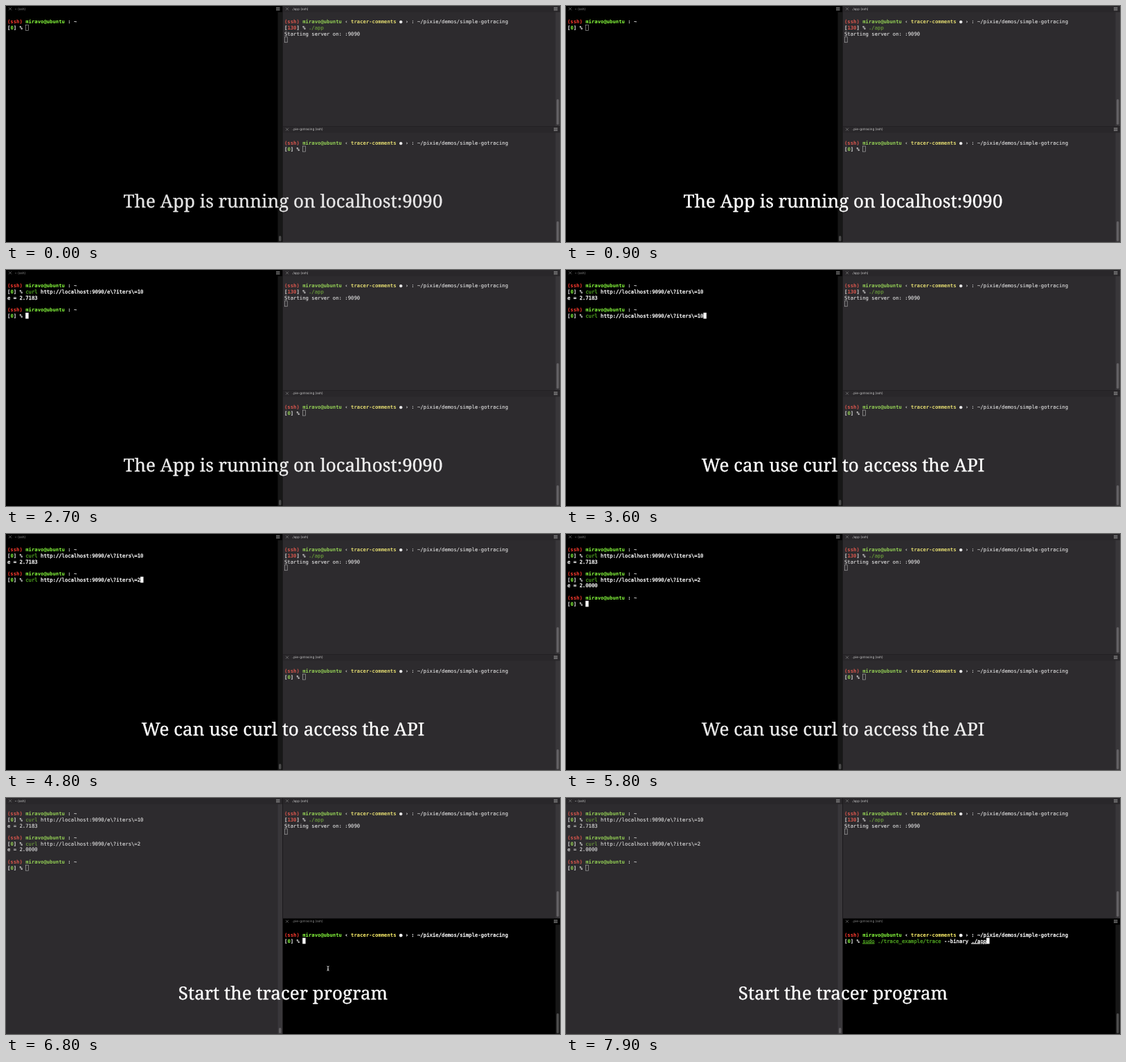
Write an HTML page that moves like this. It is 800x342 px and loops after 8 s.

```html
<!DOCTYPE html>
<html lang="en">
<head>
<meta charset="utf-8">
<title>Terminal tracing demo</title>
<style>
  html, body { margin: 0; width: 100%; height: 100%; overflow: hidden; background: #000; }
  svg { display: block; width: 800px; height: 342px; }
  text { white-space: pre; text-rendering: geometricPrecision; }
  .on  { --bg: #000; --bar: #000; --track: #171717; --thumb: #4c4c4c; --title: #8e8e8e; --weight: .32;
         --fg: #fff; --red: #ff3b2f; --green: #86fb3c; --yellow: #fff36b; --cmd: #4fa321; }
  .off { --bg: #2d2b2e; --bar: #29272a; --track: #39373a; --thumb: #626063; --title: #c9c9c9; --weight: .1;
         --fg: #e4e4e4; --red: #d8564d; --green: #93cf55; --yellow: #e2da70; --cmd: #6fa53c; }
  .term { font: 7.25px "DejaVu Sans Mono", "Liberation Mono", monospace; color: var(--fg);
          fill: currentColor; stroke: currentColor; stroke-width: var(--weight); }
  .title { font: 4.7px Inter, "Open Sans", sans-serif; fill: var(--title); }
  .red { color: var(--red); }
  .green { color: var(--green); }
  .yellow { color: var(--yellow); }
  .cmd { color: var(--cmd); }
  .red, .green, .yellow, .bold { font-weight: bold; stroke-width: 0; }
  .line { text-decoration: underline; }
  .caption { font: 26.05px "Noto Serif", serif; fill: #fff; stroke: #fff; stroke-width: .3; text-anchor: middle; }
</style>
</head>
<body>
<svg id="stage" viewBox="0 0 800 342"></svg>
<script>
const LOOP = 8000, CELL = 4.365, ROW = 8.73;
const stage = document.getElementById('stage');

const span = (cls, text) => `<tspan class="${cls}">${text}</tspan>`;
const rect = (x, y, w, h, fill) => `<rect x="${x}" y="${y}" width="${w}" height="${h}" fill="${fill}"/>`;

const user = span('red', '(ssh)') + ' ' + span('green', 'miravo@ubuntu');
const home = user + span('bold', ' : ~');
const repo = user + ' ‹ ' + span('yellow', 'tracer-comments') + ' ● › : ~/pixie/demos/simple-gotracing';
const prompt = (code, cls) => span('bold', '[') + span(cls, code) + span('bold', '] % ');
const ready = prompt('0', 'green');
const curl = n => ready + span('cmd', 'curl') + ' http://localhost:9090/e\\?iters\\=' + n;
const trace = ready + span('cmd line', 'sudo') + ' ' + span('cmd', './trace_example/trace')
  + ' --binary ' + span('line', './app');

// Terminal pane: title bar, scroll bar, text rows and block cursor
function pane(p) {
  const { x, y, w, h } = p, right = x + w, mid = y + 4.2;
  let s = `<g class="${p.active ? 'on' : 'off'}">`
    + rect(x, y, w, h, 'var(--bg)') + rect(x, y, w, 9, 'var(--bar)')
    + rect(right - 6.5, y + 9, 6.5, h - 9, 'var(--track)')
    + `<rect x="${right - 5}" y="${p.thumb[0]}" width="3.4" height="${p.thumb[1]}" rx="1.7" fill="var(--thumb)"/>`
    + `<path d="M${x + 4} ${mid - 2}l4 4m0 -4l-4 4" stroke="#8a8a8a" stroke-width=".6"/>`
    + `<path d="M${right - 9} ${mid - 1.8}h5.5m-5.5 1.8h5.5m-5.5 1.8h5.5" stroke="#a8a8a8" stroke-width=".8"/>`
    + `<text class="title" x="${x + 12.6}" y="${mid + 1.6}">${p.title}</text>`;
  const top = y + (y ? 19.3 : 18.2), left = x + 2;
  const [col, row] = p.cursor, cx = left + col * CELL, cy = top + row * ROW;
  s += p.solid ? rect(cx, cy, 4.4, 8.7, 'var(--fg)')
    : `<rect x="${cx + .4}" y="${cy + .4}" width="3.8" height="8" fill="none" stroke="#b8b8b8" stroke-width=".6"/>`;
  p.rows.forEach((r, i) => {
    if (r) s += `<text class="term" x="${left}" y="${top + 6.9 + i * ROW}">${r}</text>`;
  });
  return s + '</g>';
}

// Left terminal: [start, rows, cursor]
const first = [home, curl(10), 'e = 2.7183', '', home];
const second = [...first, curl(2), 'e = 2.0000', '', home, ready];
const search = q => [home, q ? curl(10) : ready, `bck-i-search: ${q}_`];
const shell = [
  [0, [home, ready], [6, 1]],
  [1900, search(''), [6, 1]],
  [2100, search('c'), [6, 1]],
  [2200, search('cu'), [6, 1]],
  [2300, search('cur'), [6, 1]],
  [2700, [...first, ready], [6, 5]],
  [3400, [...first, curl(10)], [45, 5]],
  [4000, [...first, curl(1)], [44, 5]],
  [4100, [...first, curl('')], [43, 5]],
  [4600, [...first, curl(2)], [44, 5]],
  [5000, second, [6, 9]]
];
const FOCUS = 1000, SWITCH = 6800, RECALL = 7300;

// Captions: [text, fade-in start, fade-in end, fade-out start, fade-out end]
const captions = [
  ['The App is running on localhost:9090', -800, 100, 2685, 2900],
  ['We can use curl to access the API', 2900, 3100, 5785, 6000],
  ['Start the tracer program', 6000, 6200, 9000, 9100]
];
const ramp = (t, a, b) => Math.min(1, Math.max(0, (t - a) / (b - a)));

function pointer(t) {
  if (t < 6200 || t >= RECALL) return '';
  const k = 1 - (1 - ramp(t, 6200, 6600)) ** 2;
  const shape = 'M-1.6 -3.2Q0 -3.2 0 -2Q0 -3.2 1.6 -3.2M0 -2V2M-1.6 3.2Q0 3.2 0 2Q0 3.2 1.6 3.2M-.9 .8H.9';
  return `<g transform="translate(${425 + 40 * k} ${232 + 15 * k})" fill="none">`
    + `<path d="${shape}" stroke="#000" stroke-width="1.8"/><path d="${shape}" stroke="#eee" stroke-width=".9"/></g>`;
}

function scene(t) {
  const [, rows, cursor] = shell.findLast(s => t >= s[0]);
  const tracing = t >= SWITCH, recalled = t >= RECALL;
  let s = pane({ x: 0, y: 0, w: 399, h: 342, title: '~ (ssh)', thumb: [333, 8],
    active: !tracing, solid: t >= FOCUS && !tracing, rows, cursor });
  s += pane({ x: 400, y: 0, w: 400, h: 174, title: './app (ssh)', thumb: [135, 37], active: false,
    rows: [repo, prompt('130', 'red') + span('cmd', './app'), 'Starting server on: :9090'], cursor: [0, 3] });
  s += pane({ x: 400, y: 174.6, w: 400, h: 167.4, title: '..pie-gotracing (ssh)', thumb: [312, 29],
    active: tracing, solid: tracing, rows: [repo, recalled ? trace : ready], cursor: [recalled ? 47 : 6, 1] });
  s += rect(399, 0, 1, 342, '#1c1a1c') + rect(400, 174, 400, .6, '#29272a');
  for (const [text, a, b, c, d] of captions) {
    const alpha = ramp(t, a, b) * (1 - ramp(t, c, d));
    if (alpha) s += `<text class="caption" x="400" y="292" opacity="${alpha.toFixed(3)}">${text}</text>`;
  }
  return s + pointer(t);
}

let shown = '';
const start = performance.now();
function tick() {
  const next = scene((performance.now() - start) % LOOP);
  if (next !== shown) stage.innerHTML = shown = next;
  requestAnimationFrame(tick);
}
tick();
</script>
</body>
</html>
```
